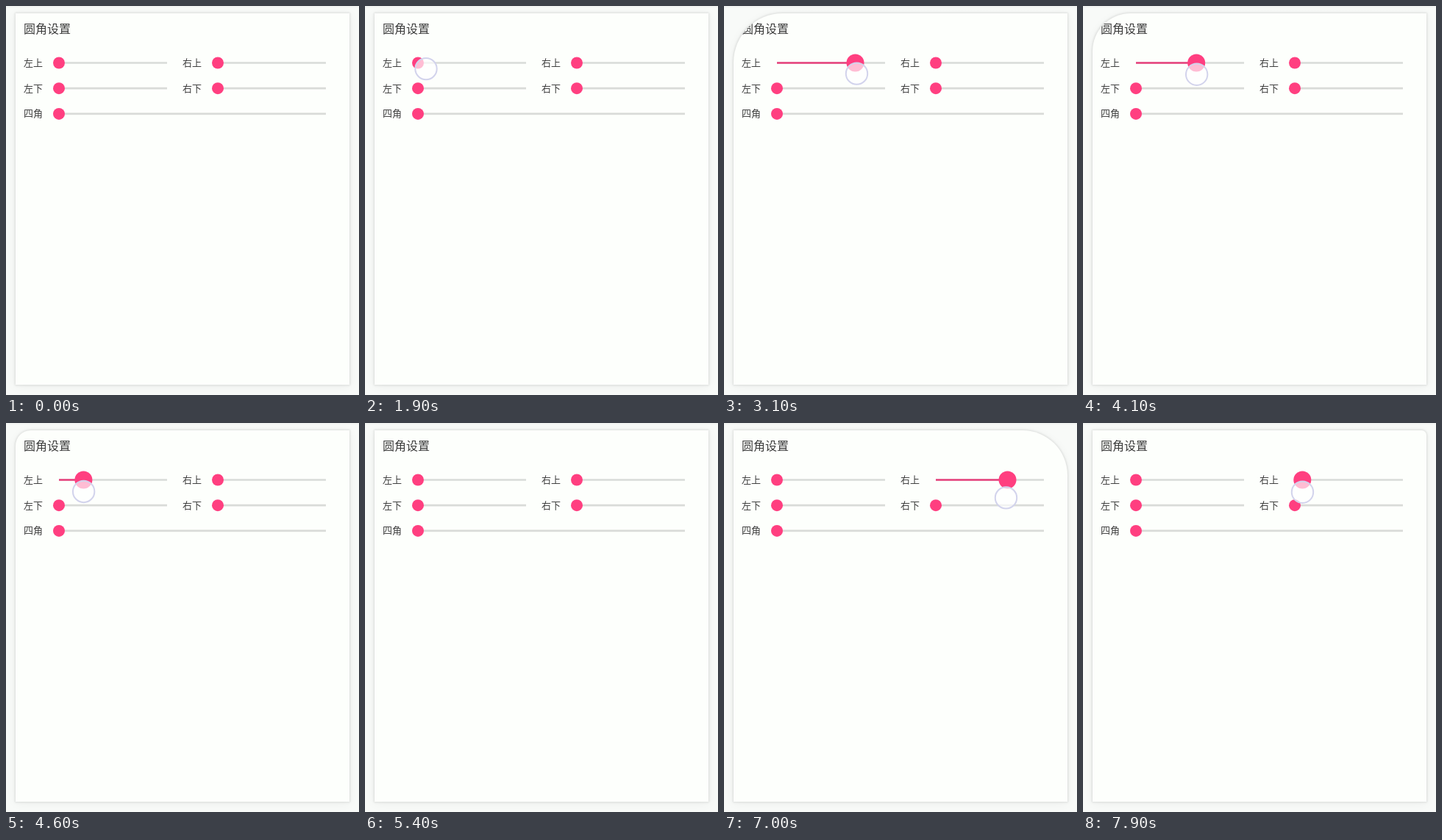
An HTML page that plays this animation: 480x530 px, repeating every 8000 ms.

```html
<!DOCTYPE html>
<html lang="zh-CN">
<head>
<meta charset="utf-8">
<style>
  html, body { margin: 0; width: 480px; height: 530px; overflow: hidden; }
  body { position: relative; background: linear-gradient(#eff1ef, #f8faf8 3px); }
  #card {
    position: absolute; left: 13px; top: 10px; width: 454px; height: 506px;
    background: #fdfffc; overflow: hidden;
    box-shadow: 0 0 3px 1px rgba(0, 10, 0, .1), 0 2px 14px rgba(0, 10, 0, .05);
  }
  svg { position: absolute; left: 0; top: 0; }
  text { font: 13px "Noto Sans CJK SC", "Noto Sans CJK", sans-serif; fill: #3c3c3c; }
  .title { font-size: 16px; }
  line { stroke-width: 2.7; stroke: #d9dbd8; }
  .fill { stroke: #e8417c; }
  .thumb { fill: #ff3f80; }
  #touch { fill: #fff; fill-opacity: .66; stroke: #d2d3ec; stroke-width: 2; }
</style>
</head>
<body>
<div id="card">
  <svg id="panel" width="454" height="506" viewBox="13 10 454 506">
    <text class="title" x="24" y="37">圆角设置</text>
  </svg>
</div>
<svg width="480" height="530"><circle id="touch" r="14.7"/></svg>
<script>
const card = document.getElementById('card');
const panel = document.getElementById('panel');
const touch = document.getElementById('touch');
const LOOP = 8000, STEP = 100, TRACK = 147, MAX_RADIUS = 92;

function add(tag, attrs, text = '') {
  const el = document.createElementNS('http://www.w3.org/2000/svg', tag);
  for (const key in attrs) el.setAttribute(key, attrs[key]);
  el.textContent = text;
  return panel.appendChild(el);
}

function slider(label, x, row, length = TRACK) {
  const y = 77.5 + row * 34.7;
  add('text', { x: x - 48, y: Math.floor(y + 5) }, label);
  add('line', { x1: x, x2: x + length, y1: y, y2: y });
  const fill = add('line', { class: 'fill', x1: x, x2: x, y1: y, y2: y });
  const thumb = add('circle', { class: 'thumb', cx: x, cy: y, r: 8 });
  return {
    x,
    set(value, pressed) {
      const end = x + value * length;
      fill.setAttribute('x2', end);
      thumb.setAttribute('cx', end);
      thumb.setAttribute('r', pressed ? 12 : 8);
    }
  };
}

const topLeft = slider('左上', 72, 0);
const topRight = slider('右上', 288, 0);
slider('左下', 72, 1);
slider('右下', 288, 1);
slider('四角', 72, 2, 363);

// Press at start, rise to max by top, fall from turn to min by rest, let go at end.
// leanX and leanY: how far the finger strays from the thumb at full value.
const drags = [
  { slider: topLeft, corner: 'borderTopLeftRadius', min: 0, max: 1, leanX: 0, leanY: 0,
    start: 1900, top: 3500, turn: 3600, rest: 5300, end: 5400, rise: 1.12, fall: 1.67 },
  { slider: topRight, corner: 'borderTopRightRadius', min: .07, max: .96, leanX: -6.5, leanY: 15,
    start: 5900, top: 6700, turn: 6700, rest: 7600, end: LOOP, rise: 1, fall: 1 }
];

const progress = (t, from, to) => Math.min(1, Math.max(0, (t - from) / (to - from)));

function valueAt(d, t) {
  if (t < d.turn) return d.max * progress(t, d.start, d.top) ** d.rise;
  return d.min + (d.max - d.min) * (1 - progress(t, d.turn, d.rest)) ** d.fall;
}

function draw(now) {
  const t = Math.floor(now % LOOP / STEP) * STEP;
  let touching = false;
  for (const d of drags) {
    const active = t >= d.start && t < d.end;
    const value = active ? valueAt(d, t) : 0;
    d.slider.set(value, active && t > d.start);
    card.style[d.corner] = value * MAX_RADIUS + 'px';
    if (active) {
      const unsettled = Math.exp((d.start - t) / 700);
      touching = true;
      touch.setAttribute('cx', d.slider.x + value * (TRACK + d.leanX) + 11 * unsettled);
      touch.setAttribute('cy', 93.6 + value * d.leanY - 8 * unsettled);
    }
  }
  touch.style.display = touching ? '' : 'none';
}

const begin = performance.now();
function frame() {
  draw(performance.now() - begin);
  requestAnimationFrame(frame);
}
frame();
</script>
</body>
</html>
```
